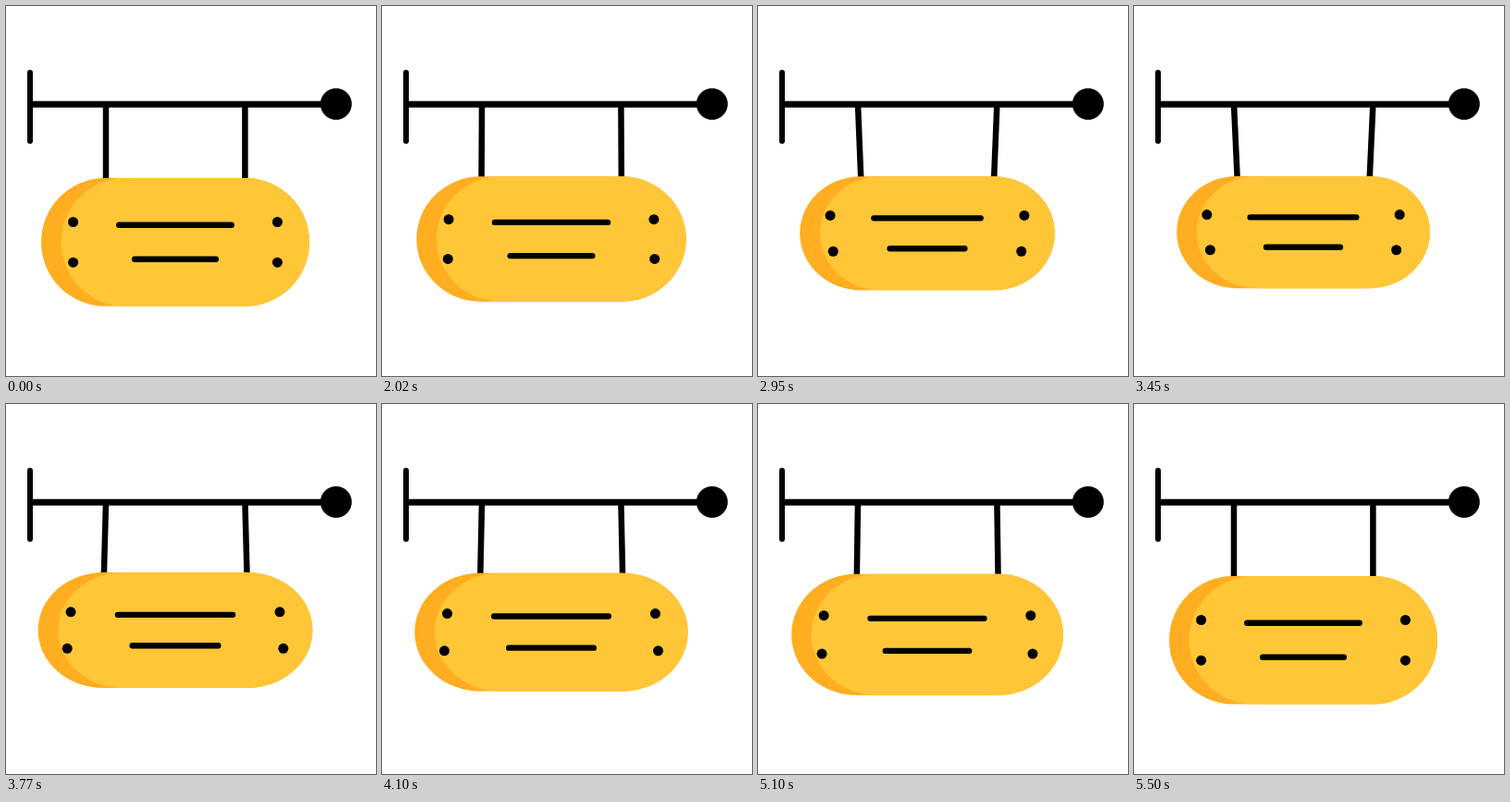
These frames come from a looping animation (400x400 px, 5520 ms). An HTML page with a canvas:

```html
<!DOCTYPE html>
<html>
<head>
<meta charset="utf-8">
<style>
  html, body { margin: 0; width: 100%; height: 100%; overflow: hidden; background: #fff; }
  canvas { display: block; }
</style>
</head>
<body>
<canvas id="stage" width="400" height="400"></canvas>
<script>
const ctx = document.getElementById('stage').getContext('2d');
const LOOP = 5520, START = 2020, STEP = 25;
const CX = 183, BAR_Y = 106, TOP = 186, HEIGHT = 138.5, HALF = 145;

// Turning points of the swing: [time, widening of the panel in px]
const SWING = [[2000, 0], [2350, 7.8], [3233, -12], [3905, 5], [4470, -4], [5010, 2], [5500, 0]];

function swingAt(t) {
  const i = SWING.findIndex(([time]) => time > t);
  if (i < 1) return 0;
  const [t0, a] = SWING[i - 1], [t1, b] = SWING[i];
  const u = (t - t0) / (t1 - t0);
  const ease = i === 1 ? Math.sin(u * Math.PI / 2) : (1 - Math.cos(u * Math.PI)) / 2;
  return a + (b - a) * ease;
}

// How far the panel's top and bottom rise per px of widening
function liftRates(t, p) {
  if (p > 0) return t < 3200 ? [2.5, 6.9] : [1.2, 5.2];
  return t < 4000 ? [0.25, 2.375] : [0.8, 2.8];
}

function line(x0, y0, x1, y1, width, cap = 'butt') {
  ctx.lineWidth = width;
  ctx.lineCap = cap;
  ctx.beginPath();
  ctx.moveTo(x0, y0);
  ctx.lineTo(x1, y1);
  ctx.stroke();
}

function dot(x, y, r) {
  ctx.beginPath();
  ctx.arc(x, y, r, 0, 2 * Math.PI);
  ctx.fill();
}

function capsule(left, right, top, bottom, rx, color) {
  const ry = (bottom - top) / 2, y = top + ry;
  ctx.fillStyle = color;
  ctx.beginPath();
  ctx.ellipse(left + rx, y, rx, ry, 0, Math.PI / 2, Math.PI * 1.5);
  ctx.ellipse(right - rx, y, rx, ry, 0, -Math.PI / 2, Math.PI / 2);
  ctx.fill();
}

function draw(t) {
  const p = swingAt(t);
  const [topRate, bottomRate] = liftRates(t, p);
  const top = TOP - Math.abs(p) * topRate;
  const bottom = TOP + HEIGHT - Math.abs(p) * bottomRate;
  const mapY = y => top + (y - TOP) / HEIGHT * (bottom - top);
  const upper = 1 + p / HALF;
  const lower = 1 + p / HALF * (p > 0 ? 2.5 : 1.57);

  ctx.fillStyle = '#fff';
  ctx.fillRect(0, 0, 400, 400);
  ctx.fillStyle = ctx.strokeStyle = '#000';

  // Bracket and hangers
  line(26, 72, 26, 146, 6, 'round');
  line(26, BAR_Y + 0.3, 357, BAR_Y + 0.3, 7);
  dot(356.8, BAR_Y, 17);
  const spread = p * (p > 0 ? 0.63 : 0.45);
  line(108, BAR_Y, 108 - spread, top + 2, 6.5);
  line(258.4, BAR_Y, 258.4 + spread, top + 2, 6.5);

  // Panel
  const left = CX - HALF - p, right = CX + HALF + p, rx = HEIGHT / 2 * upper;
  capsule(left, right, top, bottom, rx, '#ffad21');
  capsule(left + 21.5, right, top, bottom, rx, '#ffc637');

  // Screws and lettering
  ctx.fillStyle = '#000';
  for (const [dotY, lineY, half, scale] of [[233.5, 236.8, 60.7, upper], [277.2, 273.8, 43.8, lower]]) {
    for (const side of [-1, 1]) dot(CX + side * 110.4 * scale, mapY(dotY), 5.5);
    line(CX - half * scale, mapY(lineY), CX + half * scale, mapY(lineY), 6.4, 'round');
  }
}

function frame() {
  const t = performance.now() % LOOP;
  draw(t < START ? 0 : START + Math.floor((t - START) / STEP) * STEP);
  requestAnimationFrame(frame);
}
frame();
</script>
</body>
</html>
```
